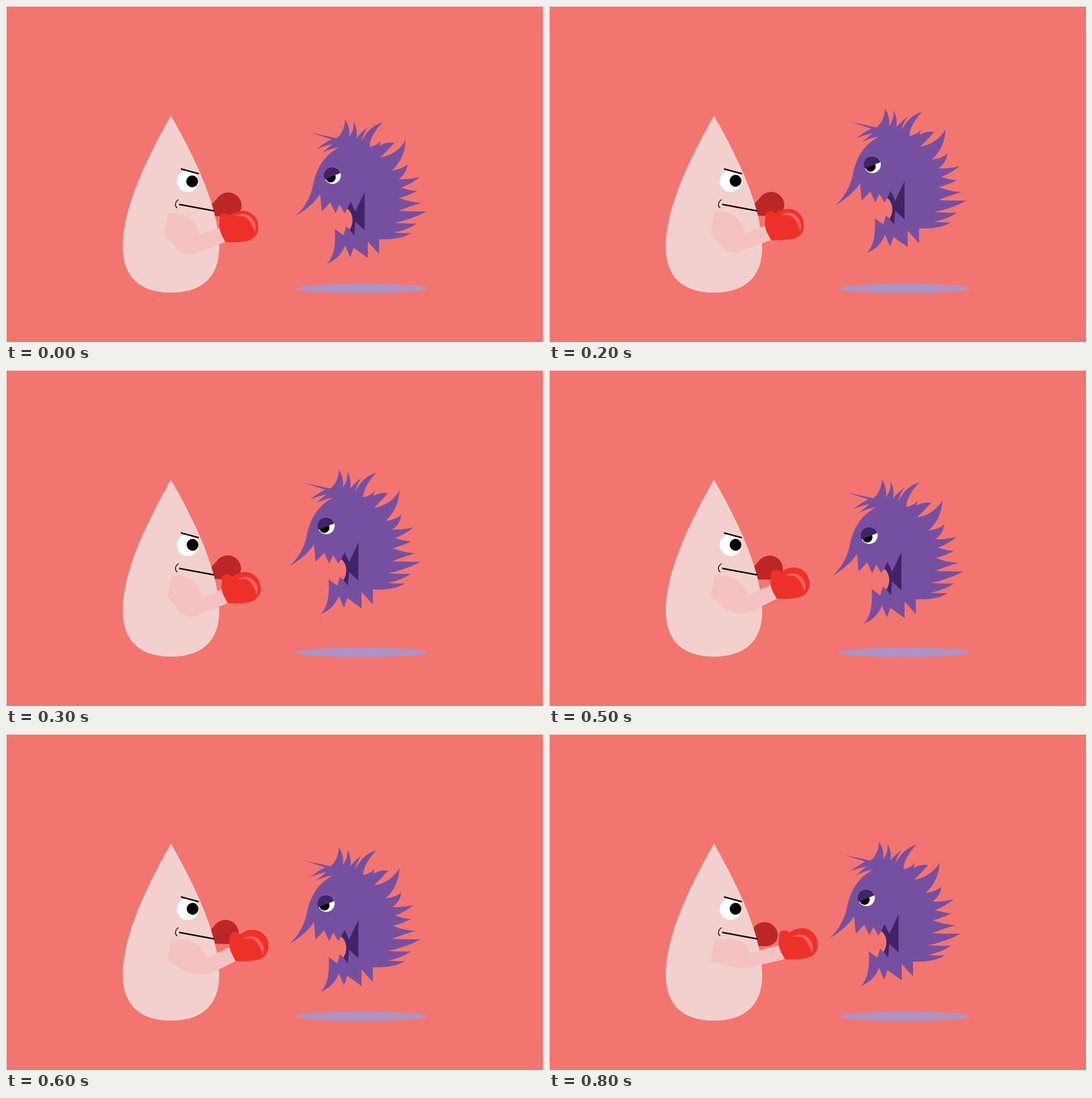
Animation, 947 px wide and 592 px high, one loop 900 ms. Source, as an HTML page with a canvas:

```html
<!DOCTYPE html>
<html lang="en">
<head>
<meta charset="utf-8">
<title>Drop versus monster</title>
<style>
  html, body { margin: 0; width: 100%; height: 100%; overflow: hidden; background: #f37570; }
  canvas { display: block; }
</style>
</head>
<body>
<canvas id="stage" width="947" height="592"></canvas>
<script>
const ctx = document.getElementById('stage').getContext('2d');
const LOOP = 900, STEP = 100;

const SKIN = '#f2d0ce', ARM = '#f4c2c0', GLOVE = '#ee3128', GLOVE_BACK = '#bc2726',
      SHINE = '#f4605e', FUR = '#7650a0', DARK = '#412466', SHADOW = '#ad93c6';

const drop = new Path2D(
  'M291 193C262 245 206 345 206 425C206 477 236 505 291 505' +
  'C346 505 376 477 376 425C376 345 320 245 291 193Z');

const glove = new Path2D(
  'M377 371C380 364 389 363 395 369C402 363 411 361 417 361C434 361 445 374 445 390' +
  'C445 405 434 414 418 415C408 417 396 416 387 416C382 406 376 398 376 386Z');

const shine = new Path2D(
  'M404 370C420 362 432 368 438 380C441 386 441 392 439 399' +
  'C435 388 430 378 424 373C418 369 411 371 404 370Z');

// Centred on the round part of the fist
const backGlove = new Path2D(
  'M-36 4L-27 -4Q-22 -9 -18 -14A23.5 23.5 0 0 1 23.5 0' +
  'C23.5 13 14 19 2 20L-36 19Z');

const hair =
  'M511 370Q534 348 541 318C547 285 562 263 587 249' +
  'Q570 252 557 259Q568 250 576 243Q562 246 548 252Q561 241 574 235L537 223L583 233' +
  'Q597 222 598 200Q608 215 605 231Q615 218 613 203Q621 218 618 233Q627 222 638 214' +
  'Q629 226 627 238Q640 212 664 205Q642 228 641 248Q655 246 661 237L659 246' +
  'Q672 239 685 241Q672 255 660 267Q691 261 705 236';
const spines =
  'Q703 270 680 290Q700 287 708 279Q706 296 692 305Q712 306 730 301Q714 314 697 320' +
  'Q711 325 725 326Q710 334 693 338Q713 346 733 347Q714 352 692 361Q716 362 742 362' +
  'Q715 376 685 382Q706 384 725 383Q708 395 684 399Q700 401 714 400Q697 412 658 411';
const jaws =
  'V437L638 415V444L613 426L607 443L598 422Q589 445 566 454Q583 438 580 393' +
  'L595 404L600 388L606 394C613 385 614 366 602 357L597 365L588 350L581 365' +
  'L572 346L557 362L554 331Q543 350 511 370Z';
const fur = new Path2D(hair + spines + jaws);
const throat = new Path2D(
  'M602 357L608 345L616 362L632.5 328V395L616 380L614 404L606 394C613 385 614 366 602 357Z');

// time, monster dx dy, back fist x y, glove dx dy, inner elbow x y, lower elbow x y, shoulder dx dy, shine dx dy
const poses = [
  [0,   0, 0,       392, 351, 0, 0,     340, 403, 322, 437, -6, 3,  0, 0],
  [100, 0, -14,     392, 351, 5, -2,    346, 401, 325, 434, 0, 0,   0, 0],
  [300, -11, -24,   391, 349, 4, -5,    346, 401, 325, 434, 0, 0,   0, 3],
  [400, -11, -14,   391, 349, 11, -10,  346, 401, 335, 433, 0, 0,   -1, 4],
  [600, -11, 0,     387, 350, 18, -16,  353, 395, 347, 424, 0, 0,   -4, 6],
  [800, -16, -10,   380, 354, 29, -19,  354, 386, 346, 412, 0, 0,   -4, 6]
];

const mix = (a, b, k) => a + (b - a) * k;

function poseAt(t) {
  let i = 0;
  while (i < poses.length - 2 && t >= poses[i + 1][0]) i++;
  const a = poses[i], b = poses[i + 1];
  const k = (t - a[0]) / (b[0] - a[0]);
  return a.map((v, n) => mix(v, b[n], k)).slice(1);
}

function fill(path, color) {
  ctx.fillStyle = color;
  ctx.fill(path);
}

function disc(x, y, r, color, ry = r) {
  ctx.fillStyle = color;
  ctx.beginPath();
  ctx.ellipse(x, y, r, ry, 0, 0, Math.PI * 2);
  ctx.fill();
}

function stroke(d, width) {
  ctx.strokeStyle = '#000';
  ctx.lineWidth = width;
  ctx.stroke(new Path2D(d));
}

function at(x, y, draw) {
  ctx.save();
  ctx.translate(x, y);
  draw();
  ctx.restore();
}

function drawArm(gx, gy, ix, iy, lx, ly, sx, sy) {
  const ax = 291.5 + sx, ay = 362 + sy, bx = 285 + sx, by = 400 + sy / 3;
  ctx.fillStyle = ARM;
  ctx.beginPath();
  ctx.moveTo(ax, ay);
  ctx.bezierCurveTo(ax + 26, ay - 3, ix - 4, iy - 27, ix, iy);
  ctx.lineTo(377 + gx, 391 + gy);
  ctx.lineTo(389 + gx, 415 + gy);
  ctx.lineTo(lx + 14, ly - 2);
  ctx.bezierCurveTo(lx, ly + 3, lx - 13, ly, mix(lx, bx, 0.5), mix(ly, by, 0.27));
  ctx.lineTo(bx, by);
  ctx.fill();
}

function drawFace(t) {
  disc(320.5, 308.5, 19.3, '#fff');
  disc(t < STEP ? 328.3 : 329, t < STEP ? 309 : 308, 10.4, '#000');
  stroke('M308.5 287L340 295.5', 2.6);
  stroke('M305 349.5L367 361', 2.6);
  stroke('M304.5 341C298 345 297 352 302 356', 1.4);
}

function drawMonster() {
  fill(fur, FUR);
  fill(throat, DARK);
  disc(575.8, 298.6, 14.8, '#fff');
  disc(572.5, 302, 9, '#000');
  ctx.fillStyle = DARK;
  ctx.beginPath();
  ctx.arc(575.5, 298.8, 15, 2.68, -0.31);
  ctx.fill();
}

function render(t) {
  const [mx, my, bx, by, gx, gy, ix, iy, lx, ly, sx, sy, hx, hy] = poseAt(t);
  ctx.fillStyle = '#fff';
  ctx.fillRect(0, 0, 947, 592);
  ctx.fillStyle = '#f37570';
  ctx.fillRect(1, 1, 946, 591);

  disc(627, 497.5, 116, SHADOW, 8);
  at(mx, my, drawMonster);

  at(bx, by, () => fill(backGlove, GLOVE_BACK));
  fill(drop, SKIN);
  drawFace(t);
  drawArm(gx, gy, ix, iy, lx, ly, sx, sy);
  at(gx, gy, () => fill(glove, GLOVE));
  at(gx + hx, gy + hy, () => fill(shine, SHINE));
}

const start = performance.now();
function tick() {
  const t = (performance.now() - start) % LOOP;
  render(Math.floor(t / STEP) * STEP);
  requestAnimationFrame(tick);
}
tick();
</script>
</body>
</html>
```
